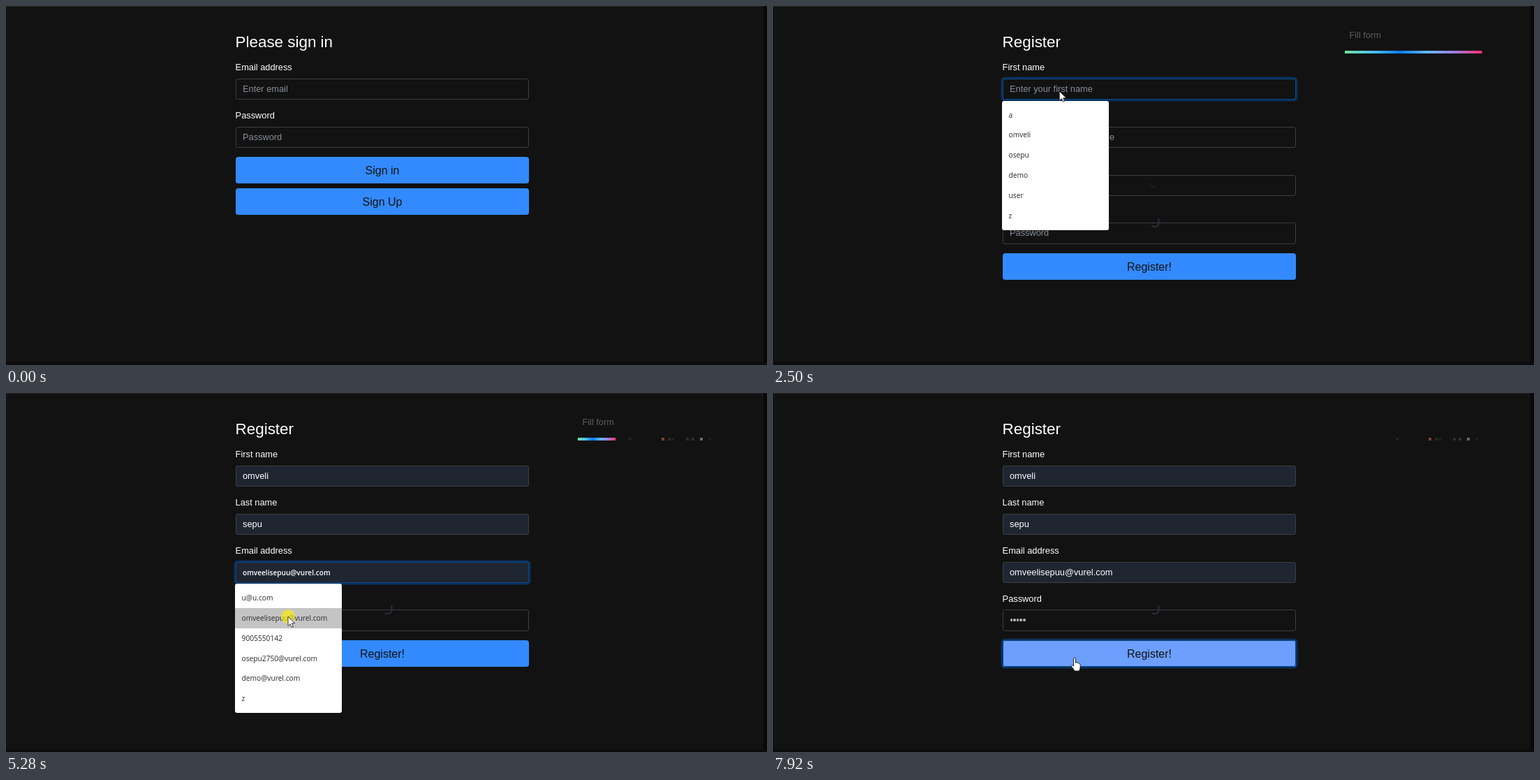
Animation of 1090 by 514 pixels, one loop 7.99 s. Source, as an HTML page:

```html
<!DOCTYPE html>
<html lang="en">
<head>
<meta charset="utf-8">
<title>Registration form</title>
<style>
html, body { margin: 0; width: 100%; height: 100%; overflow: hidden; background: #121212; }
#stage { position: relative; width: 1090px; height: 514px; overflow: hidden; background: #121212;
  font: 12.8px/19.2px "Liberation Sans", Arial, sans-serif; color: #fff; }
#stage div, #stage svg { position: absolute; box-sizing: border-box; white-space: pre; }
.edge-top { left: 0; top: 0; width: 1085px; height: 1px; background: #242424; }
.edge-right { left: 1085px; top: 0; width: 5px; height: 514px; background: #080808; }
.edge-bottom { left: 0; top: 510px; width: 1090px; height: 4px; background: #0c0c0c; }
.status { left: 0; top: 509.5px; width: 354px; height: 5px; background: #000; border-radius: 0 3px 0 0; }
.page { left: 329px; top: 0; width: 420px; height: 514px; }
.title { left: -.4px; top: 39.4px; font-size: 22.4px; line-height: 26.9px; }
.group { left: 0; width: 420px; height: 56px; }
.label { left: -.4px; top: -.2px; }
.box { left: 0; top: 25.6px; width: 420px; height: 30.4px; padding-left: 9px; line-height: 28.4px;
  border: 1px solid #3c3e40; border-radius: 3.2px; }
.hint { left: 9px; top: 0; color: #868e96; }
.fill { background: #1f2531; }
.preview { font: 600 10.1px/29px "Open Sans", "Noto Sans", sans-serif; }
.ring { border: 1px solid #07498c; border-radius: 3.2px; box-shadow: 0 0 0 2.56px rgba(0, 105, 225, .34); }
.box.ring { background: none; }
.caret { top: 6px; width: 1px; height: 16px; background: #c8c8c8; }
.dot { top: 38.2px; width: 3.6px; height: 3.6px; border-radius: 50%; background: #b4b4b4; }
.button { left: 0; width: 420px; height: 38.4px; border-radius: 3.84px; background: #338aff;
  color: #121212; font-size: 16px; line-height: 39.4px; text-align: center; }
.lit { background: #6c9fff; }
.button.ring { background: #6c9fff; line-height: 37.4px; }
.list { left: -1px; top: 57.2px; width: 153px; height: 185px; background: #fff; border-radius: 3px; overflow: hidden;
  color: #26292d; font: 10.2px/28.8px "Open Sans", "Noto Sans", sans-serif; }
.row { left: 0; width: 153px; height: 28.8px; padding-left: 9.6px; }
.picked { background: #c4c4c4; }
.speck { top: 64px; width: 4px; height: 4px; }
.toast { left: 819px; top: 16.8px; width: 256px; height: 51.2px; color: #5c5c5c;
  animation: toast 7990ms infinite; }
.toast-text { left: 6.4px; top: 15.6px; }
.bar { left: 0; bottom: 0; width: 256px; height: 4px; transform-origin: left;
  background: linear-gradient(to right, #6fe09a, #4cc4ee, #0a7cff, #62b8ff, #9a7fe0, #ff2d6a);
  animation: drain 7990ms linear infinite; }
/* slides in at 1340 ms, drains for 5 s, slides out */
@keyframes toast {
  0%, 16.77% { transform: translateX(3000px); opacity: 0; animation-timing-function: cubic-bezier(.215, .61, .355, 1); }
  22.03% { transform: translateX(-25px); opacity: 1; animation-timing-function: cubic-bezier(.215, .61, .355, 1); }
  23.34% { transform: translateX(10px); animation-timing-function: cubic-bezier(.215, .61, .355, 1); }
  24.66% { transform: translateX(-5px); animation-timing-function: cubic-bezier(.215, .61, .355, 1); }
  25.53%, 79.35% { transform: none; }
  81.1% { transform: translateX(-20px); opacity: 1; }
  88.11%, 100% { transform: translateX(2000px); opacity: 0; }
}
@keyframes drain {
  0%, 16.77% { transform: none; }
  79.35%, 100% { transform: scaleX(0); }
}
</style>
</head>
<body>
<div id="stage"></div>
<script>
const LOOP = 7990;
const stage = document.getElementById('stage');
const timing = { duration: LOOP, iterations: Infinity };

// Switches an element on and off in turn at the given times.
function toggle(node, times) {
  const frames = times.map((ms, i) => ({ offset: ms / LOOP, opacity: (i + 1) % 2, easing: 'steps(1, end)' }));
  if (times[0] > 0) frames.unshift({ offset: 0, opacity: 0, easing: 'steps(1, end)' });
  frames.push({ offset: 1, opacity: times.length % 2 });
  node.animate(frames, timing);
}

function add(parent, cls, text = '', style = {}, times) {
  const node = document.createElement('div');
  node.className = cls;
  node.textContent = text;
  Object.assign(node.style, style);
  parent.append(node);
  if (times) toggle(node, times);
  return node;
}

function addPage(title, times) {
  const page = add(stage, 'page', '', {}, times);
  add(page, 'title', title);
  return page;
}

function addField(page, index, label, hint, hintTimes) {
  const group = add(page, 'group', '', { top: 78.4 + 68.8 * index + 'px', zIndex: 4 - index });
  add(group, 'label', label);
  const box = add(group, 'box');
  add(box, 'hint', hint, {}, hintTimes);
  return group;
}

function addCaret(group, x, times) {
  const box = add(group, 'box', '', { borderColor: 'transparent' });
  add(box, 'caret', '', { left: x + 'px' }, times);
}

// A field filled from its list: focus, open, hover, pick, blur.
function addPicked(page, index, label, hint, value, rows, [focus, open, hover, pick, blur]) {
  const group = addField(page, index, label, hint, [0, hover]);
  add(group, 'box fill preview', value, {}, [hover, pick]);
  add(group, 'box fill', value, {}, [pick]);
  add(group, 'box ring', '', {}, [focus, blur]);
  const list = add(group, 'list', '', {}, [open, pick]);
  rows.forEach((text, i) => {
    const style = { top: 6 + 28.8 * i + 'px' };
    if (i === 1) add(list, 'row picked', '', style, [hover, pick]);
    add(list, 'row', text, style);
  });
  return group;
}

['edge-top', 'edge-right', 'edge-bottom'].forEach(cls => add(stage, cls));
add(stage, 'status', '', {}, [1220, 1540]);

const signIn = addPage('Please sign in', [0, 1220]);
addField(signIn, 0, 'Email address', 'Enter email');
addField(signIn, 1, 'Password', 'Password');
add(signIn, 'button', 'Sign in', { top: '216px' });
add(signIn, 'button', 'Sign Up', { top: '260.8px' });
add(signIn, 'button lit', 'Sign Up', { top: '260.8px' }, [780, 1220]);

const register = addPage('Register', [1220]);
const send = { top: '353.6px' };
add(register, 'button', 'Register!', send);
add(register, 'button lit', 'Register!', send, [7420]);
add(register, 'button ring', 'Register!', send, [7780]);

addPicked(register, 0, 'First name', 'Enter your first name', 'omveli',
  ['a', 'omveli', 'osepu', 'demo', 'user', 'z'], [2360, 2440, 2700, 3060, 3500]);

const last = addPicked(register, 1, 'Last name', 'Enter your lastname name', 'sepu',
  ['a', 'sepu', 'omveli', 'demo', 'user', 'z'], [3500, 3600, 3800, 4160, 4590]);
addCaret(last, 9, [3400, 3600]);
addCaret(last, 37.4, [4160, 4590]);

const mail = 'omveelisepuu@vurel.com';
const email = addPicked(register, 2, 'Email address', 'Enter email', mail,
  ['u@u.com', mail, '9005550142', 'osepu2750@vurel.com', 'demo@vurel.com', 'z'],
  [4590, 4750, 4980, 5360, 5900]);
addCaret(email, 9, [4590, 4750]);

const typed = [5900, 6590, 6700, 6910, 7060, 7230, 7780];
const password = addField(register, 3, 'Password', 'Password', [0, typed[1]]);
add(password, 'box ring', '', {}, [5900, 7780]);
for (let n = 0; n < 6; n++) {
  addCaret(password, 9 + 4.6 * n, [typed[n], typed[n + 1]]);
  if (n) add(password, 'dot', '', { left: 6 + 4.6 * n + 'px' }, [typed[n]]);
}

[[892, '#242424'], [939, '#7a4434'], [948, '#262626'], [953, '#202020'], [974, '#2a302a'],
 [982, '#26342a'], [994, '#686868'], [1006, '#1c201c']]
  .forEach(([x, color]) => add(stage, 'speck', '', { left: x + 'px', background: color }, [2075]));

const toast = add(stage, 'toast');
add(toast, 'toast-text', 'Fill form');
add(toast, 'bar');

stage.insertAdjacentHTML('beforeend', `
<svg width="1090" height="514" style="left:0;top:0" fill="none">
  <path id="trail" d="M552.5 304v6q0 6-6 6l-4-1" stroke="#2c3033" stroke-width="2"/>
  <path id="trailTop" d="M539 254q1 5 9 5.500" stroke="#1d2022" stroke-width="2"/>
  <g id="mouse">
    <circle id="click" r="10" fill="#ffee00" fill-opacity=".65"/>
    <path id="arrow" d="M0 0V13.500L3.100 10.600 5.200 15.300 7.400 14.300 5.400 9.800H9.600Z" fill="#fff" stroke="#151515" stroke-width=".8"/>
    <g id="beam">
      <path d="M-3-6.500H3M0-6.500V6.500M-3 6.500H3" stroke="#000" stroke-width="2.400"/>
      <path d="M-3-6.500H3M0-6.500V6.500M-3 6.500H3" stroke="#ddd"/>
    </g>
    <path id="hand" d="M-1.500 .5a1.500 1.500 0 0 1 3 0v6q0-1 1.300-.9t1.300 1q1.500-.6 2.400 .8q1.600-.3 1.600 1.400v3.500q0 3-1.600 5.700h-6.500q-1.500-3-4.500-6.200q-1-1.600 .4-2.200q1.200-.3 2.600 1.600z" fill="#fff" stroke="#151515" stroke-width=".9"/>
  </g>
</svg>`);

const show = (id, ...times) => toggle(document.getElementById(id), times);
show('trail', 1220);
show('trailTop', 1220, 4980);
show('arrow', 300, 780, 1220, 2210, 2500, 3060, 3600, 4160, 4860, 5400);
show('beam', 2210, 2500, 3060, 3600, 4160, 4860, 5400, 7420);
show('hand', 780, 1220, 7420);
show('click', 1070, 1200, 2330, 2440, 2980, 3080, 3390, 3510, 4080, 4180, 4570, 4680, 5230, 5360, 5860, 5960);

const path = [
  [0, 325, 512], [300, 325, 512], [500, 400, 430], [750, 530, 300], [850, 543, 262], [990, 545, 298],
  [1070, 540, 287], [1540, 540, 287], [1820, 140, 328], [2030, 260, 210], [2250, 410, 118], [2440, 410, 118],
  [2800, 415, 186], [3060, 416, 186], [3300, 417, 184], [3600, 417, 184], [3900, 408, 256], [4200, 408, 256],
  [4450, 407, 260], [4750, 407, 260], [5050, 404, 320], [5400, 404, 320], [5700, 404, 328], [7230, 404, 328],
  [7700, 432, 380], [LOOP, 432, 380]
];
document.getElementById('mouse').animate(path.map(([ms, x, y]) => ({
  offset: ms / LOOP, transform: `translate(${x}px, ${y}px)`, easing: 'ease-in-out'
})), timing);
</script>
</body>
</html>
```
